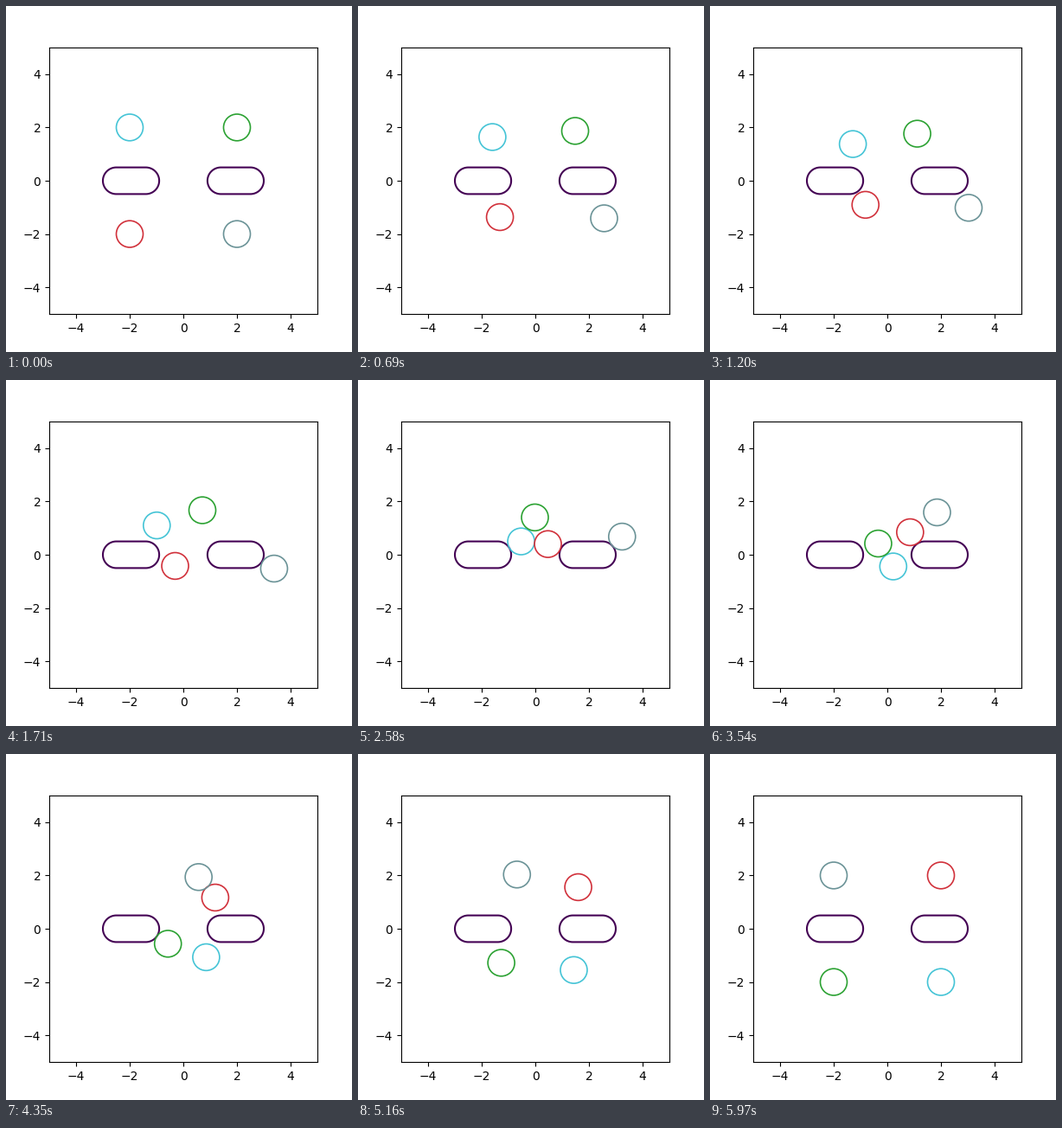
These frames come from a looping animation (400 px wide and 400 px high, 6000 ms). A matplotlib script:

```python
import numpy as np
import matplotlib.pyplot as plt
from matplotlib.animation import FuncAnimation
from matplotlib.patches import Circle

FRAMES, INTERVAL = 200, 30
RADIUS = 0.5
WALLS = [(-2.5, -1.4), (1.4, 2.5)]

# Every agent crosses from its start to the opposite corner through five points
KEY_TIMES = np.array([0, 0.69, 1.71, 2.58, 3.54, 5.16, 5.97])
AGENTS = [
    ("#45c4d6", (-2, 2), [(-1.6, 1.64), (-0.99, 1.1), (-0.53, 0.5),
                          (0.22, -0.44), (1.435, -1.55)]),
    ("#2ca233", (2, 2), [(1.485, 1.87), (0.71, 1.67), (-0.015, 1.4),
                         (-0.34, 0.42), (-1.27, -1.28)]),
    ("#d1313b", (-2, -2), [(-1.32, -1.365), (-0.305, -0.42), (0.47, 0.4),
                           (0.85, 0.845), (1.6, 1.56)]),
    ("#6b9397", (2, -2), [(2.565, -1.41), (3.385, -0.52), (3.235, 0.68),
                          (1.855, 1.59), (-0.685, 2.035)]),
]


def spline(k, points, t):
    """Natural cubic spline through points at times k, sampled at t."""
    p = np.array(points, float)
    n, h = len(k), np.diff(k)
    slope = np.diff(p, axis=0) / h[:, None]
    a, b = np.eye(n), np.zeros_like(p)
    for i in range(1, n - 1):
        a[i, i - 1:i + 2] = h[i - 1], 2 * (h[i - 1] + h[i]), h[i]
        b[i] = 6 * (slope[i] - slope[i - 1])
    m = np.linalg.solve(a, b)
    i = np.clip(np.searchsorted(k, t, side="right") - 1, 0, n - 2)
    d, w = (t - k[i])[:, None], h[i][:, None]
    return (p[i] + d * (slope[i] - w * (2 * m[i] + m[i + 1]) / 6)
            + d ** 2 * m[i] / 2 + d ** 3 * (m[i + 1] - m[i]) / (6 * w))


def keep_clear(path, x0, x1):
    """Slide a path around a wall so that disc and wall only touch."""
    near = np.column_stack([np.clip(path[:, 0], x0, x1), 0 * path[:, 0]])
    gap = path - near
    dist = np.hypot(*gap.T)[:, None]
    return near + gap * np.maximum(1, 2 * RADIUS / dist)


def draw_wall(ax, x0, x1):
    a = np.linspace(-np.pi / 2, np.pi / 2, 60)
    x = np.concatenate([x1 + RADIUS * np.cos(a), x0 - RADIUS * np.cos(a)])
    y = RADIUS * np.concatenate([np.sin(a), -np.sin(a)])
    ax.fill(x, y, fill=False, ec="#440154", lw=1.5)


fig, ax = plt.subplots(figsize=(4, 4), dpi=100)
ax.set_xlim(-5, 5)
ax.set_ylim(-5, 5)
for wall in WALLS:
    draw_wall(ax, *wall)

times = np.arange(FRAMES) * INTERVAL / 1000
paths, discs = [], []
for color, start, via in AGENTS:
    goal = (-start[0], -start[1])
    path = spline(KEY_TIMES, [start, *via, goal], times)
    for wall in WALLS:
        path = keep_clear(path, *wall)
    paths.append(path)
    discs.append(ax.add_patch(
        Circle(path[0], RADIUS, fill=False, ec=color, lw=1.2)))


def update(i):
    for disc, path in zip(discs, paths):
        disc.center = path[i]
    return discs


anim = FuncAnimation(fig, update, frames=FRAMES, interval=INTERVAL,
                     repeat=True, repeat_delay=0)
plt.show()
```
